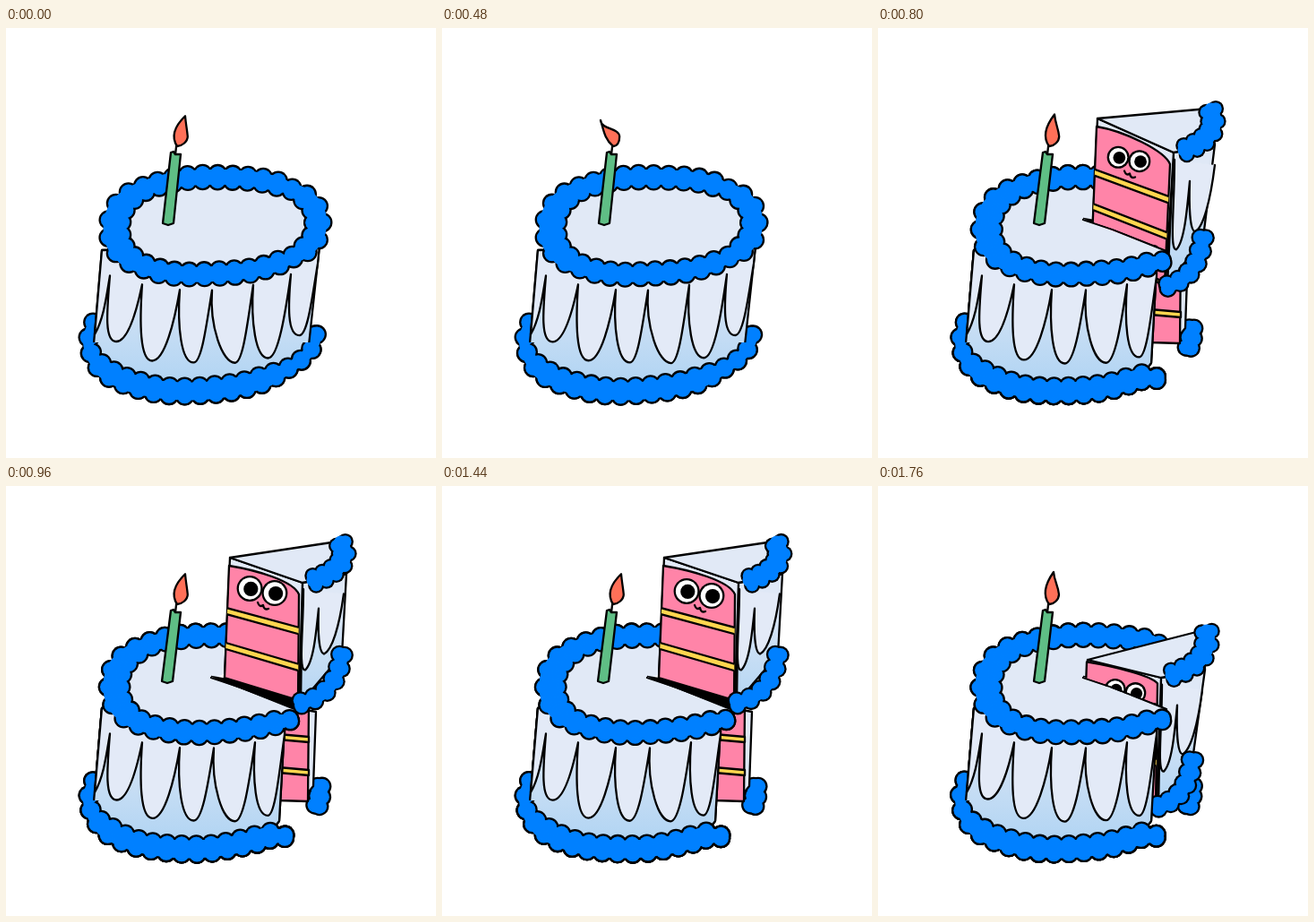
Animation, 480 px wide and 480 px high, one loop 1920 ms. Source, as an HTML page with a canvas:

```html
<!DOCTYPE html>
<html lang="en">
<head>
<meta charset="utf-8">
<title>Birthday cake</title>
<style>
  html, body { margin: 0; width: 100%; height: 100%; overflow: hidden; background: #fff; }
  canvas { display: block; width: 480px; height: 480px; }
</style>
</head>
<body>
<canvas id="stage" width="480" height="480"></canvas>
<script>
const ctx = document.getElementById('stage').getContext('2d');
const STEP = 160, INK = 2.3;
const BLUE = '#0080ff', CREAM = '#e1e9f6', PINK = '#ff84a8', YELLOW = '#ffd64f';
let step = 0;

// Small hand-drawn wobble that changes with each step
const wob = (i, amp = 0.4) => amp * Math.sin(i * 12.9898 + step * 4.37);
const clamp = v => Math.max(0, Math.min(1, v));
const add = ([x, y], dx, dy) => [x + dx, y + dy];

function trace(pts, closed = true) {
  ctx.beginPath();
  pts.forEach(p => ctx.lineTo(...p));
  if (closed) ctx.closePath();
}

function shape(pts, fill, outline = true) {
  trace(pts);
  ctx.fillStyle = fill;
  ctx.fill();
  if (outline) ctx.stroke();
}

function disc(x, y, r, fill) {
  ctx.beginPath();
  ctx.arc(x, y, r, 0, 7);
  ctx.fillStyle = fill;
  ctx.fill();
}

function shade(top, bottom) {
  const g = ctx.createLinearGradient(0, top, 0, bottom);
  g.addColorStop(0, '#dfe8f6');
  g.addColorStop(1, '#b3d5f3');
  return g;
}

// Part of a slightly skewed superellipse, clockwise from the right
function arc({ cx, cy, a, b, n, skew }, from, to) {
  const bend = v => Math.sign(v) * Math.abs(v) ** (2 / n);
  return Array.from({ length: 121 }, (_, i) => {
    const t = from + (to - from) * i / 120, dx = a * bend(Math.cos(t));
    return [cx + dx, cy + b * bend(Math.sin(t)) - skew * dx * (1 + Math.sin(t)) / 2];
  });
}

function quad(a, b, c) {
  return Array.from({ length: 41 }, (_, i) => {
    const t = i / 40, u = 1 - t;
    return [0, 1].map(j => u * u * a[j] + 2 * u * t * b[j] + t * t * c[j]);
  });
}

// Evenly spaced points with normals
function spread(path, gap) {
  const sums = [0];
  for (let i = 1; i < path.length; i++) {
    sums.push(sums[i - 1] + Math.hypot(path[i][0] - path[i - 1][0], path[i][1] - path[i - 1][1]));
  }
  const total = sums[sums.length - 1], n = Math.max(1, Math.round(total / gap)), out = [];
  for (let k = 0, i = 1; k <= n; k++) {
    const s = total * k / n;
    while (i < path.length - 1 && sums[i] < s) i++;
    const a = path[i - 1], b = path[i], len = sums[i] - sums[i - 1] || 1, f = (s - sums[i - 1]) / len;
    out.push({
      x: a[0] + (b[0] - a[0]) * f, y: a[1] + (b[1] - a[1]) * f,
      nx: (a[1] - b[1]) / len, ny: (b[0] - a[0]) / len
    });
  }
  return out;
}

// Piped icing: bumps on both sides of a solid band
function icing(path, width, r = 9.8, gap = 16.8) {
  const bumps = [];
  spread(path, gap).forEach((p, i) => {
    const off = width(p.x) - r;
    for (const side of [-1, 1]) {
      bumps.push([p.x + side * p.nx * off + wob(i + side), p.y + side * p.ny * off + wob(i * 3 + side)]);
    }
  });
  bumps.forEach(([x, y]) => disc(x, y, r + INK / 2, '#000'));
  bumps.forEach(([x, y]) => disc(x, y, r - INK / 2, BLUE));
  spread(path, 3).forEach(p => disc(p.x, p.y, width(p.x) - 5, BLUE));
}

const RIM = { cx: 234.5, cy: 220.5, a: 113.5, b: 54, n: 2.3, skew: 0.055 };
const FOOT = { cx: 219, cy: 346, a: 127, b: 59, n: 2, skew: 0.06 };
const rimWidth = x => 13.5 + 4 * clamp((155 - x) / 35) + 1.5 * clamp((x - 325) / 20) - 2.5 * clamp(1 - Math.abs(x - 316) / 12);
const footWidth = x => 15 - 4 * clamp((110 - x) / 15) - 4 * clamp((x - 290) / 25);

const rimPath = cut => cut
  ? [...arc(RIM, 5.43, 1.05), [317, 261]]
  : arc(RIM, 0, 2 * Math.PI);
const footPath = cut => cut
  ? [[311, 391], ...arc(FOOT, 0.95, Math.PI + 0.32)]
  : arc(FOOT, 0, Math.PI + 0.32);

// Frosting that hangs in drips between pointed gaps
function drips(cut) {
  const gaps = cut ? [116, 152, 194, 232, 278, 311] : [116, 152, 194, 230, 276, 318, 348];
  const tips = [123, 163, 209, 255, 292, 327];
  const gapY = x => 293 - 17 * ((x - 215) / 100) ** 2;
  const tipY = x => 374 - 25 * ((x - 222) / 100) ** 4;
  ctx.beginPath();
  ctx.moveTo(107, 248);
  ctx.lineTo(99, 342);
  ctx.bezierCurveTo(109, 325, 112, 300, gaps[0], gapY(gaps[0]));
  for (let i = 0; i < gaps.length - 1; i++) {
    const l = gaps[i], r = gaps[i + 1], x = tips[i] + wob(i, 0.6), y = tipY(tips[i]) + wob(i * 5, 0.6);
    ctx.bezierCurveTo(l - 3, gapY(l) + 0.5 * (y - gapY(l)), x - 14, y, x, y);
    ctx.bezierCurveTo(x + (r - x) * 0.45, y, r - 6, gapY(r) + 0.45 * (y - gapY(r)), r, gapY(r));
  }
  ctx.lineTo(cut ? 311 : 350, 243);
  ctx.closePath();
  ctx.fillStyle = '#e3eaf7';
  ctx.fill();
  ctx.stroke();
}

function cake(cut) {
  const rim = rimPath(cut), foot = footPath(cut);
  icing(foot, footWidth);
  const bottom = foot.filter(([x, y]) => y > 352 && x < (cut ? 305 : 338));
  shape([[350 - 39 * cut, 243 + 25 * cut], [338 - 33 * cut, 354 + 20 * cut], ...bottom, [98, 352], [107, 248]],
    shade(270, 390));
  drips(cut);
  if (cut) {
    shape([...rim, [322, 249], [232, 215]], CREAM, false);
    trace([[229, 214], [262, 225], [322, 249]], false);
    ctx.stroke();
  } else {
    shape(rim, CREAM, false);
  }
  icing(rim, rimWidth);
  // The lower icing passes in front of the body
  ctx.save();
  trace([[0, 351], [480, 351], [480, 480], [0, 480]]);
  ctx.clip();
  icing(foot, footWidth);
  ctx.restore();
}

// Inside of the cake seen through the gap
function inside() {
  icing([[350, 335], [350, 345], [347, 357]], () => 12, 9.5, 14);
  shape([[335, 250], [346, 252], [343, 335], [335, 345]], CREAM);
  shape([[302, 245], [338, 245], [337, 352], [304, 351]], PINK);
  for (const y of [280, 317]) {
    shape([[304, y - 3], [338, y], [338, y + 6], [304, y + 3]], YELLOW);
  }
}

// Corners of the slice and its eyes at each height
const LOW = {
  tip: [234, 194], front: [316, 214], back: [363, 161], side: [365, 205],
  foot: [351, 306], heel: [313, 358], eye: [276, 229], r: 11
};
const MID = {
  tip: [245, 101], front: [330, 139], back: [368, 90], side: [376, 130],
  foot: [363, 234], heel: [323, 288], eye: [280, 146.5], r: 11.5
};
const HIGH = {
  tip: [250, 80], front: [331, 108], back: [370, 62], side: [380, 98],
  foot: [375, 188], heel: [329, 242], eye: [286, 117], r: 13.5
};
const REST = { ...HIGH, tip: [248, 80], eye: [287, 120] };

function slice({ tip, front, back, side, foot, heel, eye, r }) {
  const [tx, ty] = tip, [fx, fy] = front;
  const drop = (heel[1] - fy) / 150;
  const at = (x, y) => [fx + x, fy + y * drop];
  const band = 9 * clamp((fy - ty) / 28) - 4 * (ty > 150);
  const left = [tx - 6, ty + 134];

  shape([front, side, foot, heel], shade(fy + 20, heel[1]));
  shape([tip, front, [heel[0] - 2, heel[1] - 3], left], CREAM);
  shape([tip, back, side, front], CREAM);

  ctx.beginPath();
  ctx.moveTo(...at(1, 8));
  ctx.bezierCurveTo(...at(1, 60), ...at(-5, 110), ...at(3, 109));
  ctx.bezierCurveTo(...at(12, 100), ...at(15, 65), ...at(18, 32));
  ctx.bezierCurveTo(...at(17, 60), ...at(18, 88), ...at(24, 89));
  ctx.bezierCurveTo(...at(33, 84), ...at(41, 55), ...at(46, 14));
  ctx.fillStyle = '#e3eaf7';
  ctx.fill();
  ctx.stroke();

  ctx.save();
  ctx.beginPath();
  ctx.moveTo(tx - 1, ty + band);
  ctx.bezierCurveTo(tx + 30, ty + band + 5, fx - 10, fy - 2, fx - 4, fy + band + 4);
  ctx.lineTo(heel[0] - 3, heel[1] - 3);
  ctx.lineTo(...left);
  ctx.closePath();
  ctx.fillStyle = PINK;
  ctx.fill();
  ctx.stroke();
  ctx.clip();
  for (const [l, m] of [[57, 51], [96, 92]]) {
    shape([[tx - 8, ty + l - 2], [fx, fy + m], [fx, fy + m + 7.5], [tx - 8, ty + l + 5]], YELLOW);
  }
  ctx.restore();

  for (const s of [-1, 1]) {
    const [x, y] = add(eye, s * r * 1.03, s * r * 0.19);
    disc(x, y, r + 1, '#000');
    disc(x, y, r - 1.3, '#fff');
    disc(x + 1.2, y + 0.5, r * 0.6, '#000');
  }
  ctx.beginPath();
  ctx.moveTo(...add(eye, -5, 13));
  ctx.quadraticCurveTo(...add(eye, -3, 19), ...add(eye, 1, 16));
  ctx.quadraticCurveTo(...add(eye, 2, 22), ...add(eye, 7, 20));
  ctx.stroke();

  icing(quad(add(heel, 0, 0), [foot[0] - 6, heel[1] - 8], foot), () => 12, 9, 15);
  icing(quad(add(front, 13, -3), [side[0] + 7, side[1] - 8], add(back, 4, 2)), () => 13.5, 8, 13);
}

// The tip sways sideways and drops a little when it leans
function candle(cut, lean) {
  const x = 191, y = 132, s = lean * 0.2, top = y - 37 + 0.04 * lean * lean, tip = x + lean;
  trace([[189, 141], [190.5, 129]], false);
  ctx.stroke();
  shape([[184, 139], [187, 138], [189, 141], [195, 141], [187 - cut, 218], [181 - cut, 220], [175 - cut, 218]], '#5fbe85');
  ctx.beginPath();
  ctx.moveTo(x, y);
  ctx.bezierCurveTo(x - 7 + s, y - 8, x - 8 + s, y - 19, tip, top);
  ctx.bezierCurveTo(tip + 1, top + 11, x + 9 + s, y - 21, x + 10 + s, y - 11);
  ctx.bezierCurveTo(x + 10 + s, y - 5, x + 5, y, x, y);
  ctx.fillStyle = '#ff7058';
  ctx.fill();
  ctx.stroke();
}

const POSES = [null, null, null, null, LOW, MID, HIGH, HIGH, REST, REST, MID, LOW];
const LEANS = [9, 5, 6, -14, 5, 6, 9, 8, 7, 9, 15, 5];

function draw() {
  const pose = POSES[step], cut = pose ? 1 : 0;
  ctx.fillStyle = '#fff';
  ctx.fillRect(0, 0, 480, 480);
  ctx.strokeStyle = '#000';
  ctx.lineWidth = INK;
  ctx.lineJoin = ctx.lineCap = 'round';
  if (cut) inside();
  cake(cut);
  if (cut) {
    shape([[229, 213], [246, 216], [324, 238], [322, 253], [298, 242]], '#000');
    slice(pose);
    // The near part of the cake covers the slice
    ctx.save();
    trace([[0, 0], [229, 0], [229, 213], [262, 224], [322, 247], [340, 250], [340, 480], [0, 480]]);
    ctx.clip();
    cake(cut);
    ctx.restore();
  }
  candle(cut, LEANS[step]);
}

const start = performance.now();
let shown = -1;

function tick() {
  step = Math.floor((performance.now() - start) / STEP) % POSES.length;
  if (step !== shown) {
    draw();
    shown = step;
  }
  requestAnimationFrame(tick);
}
tick();
</script>
</body>
</html>
```
